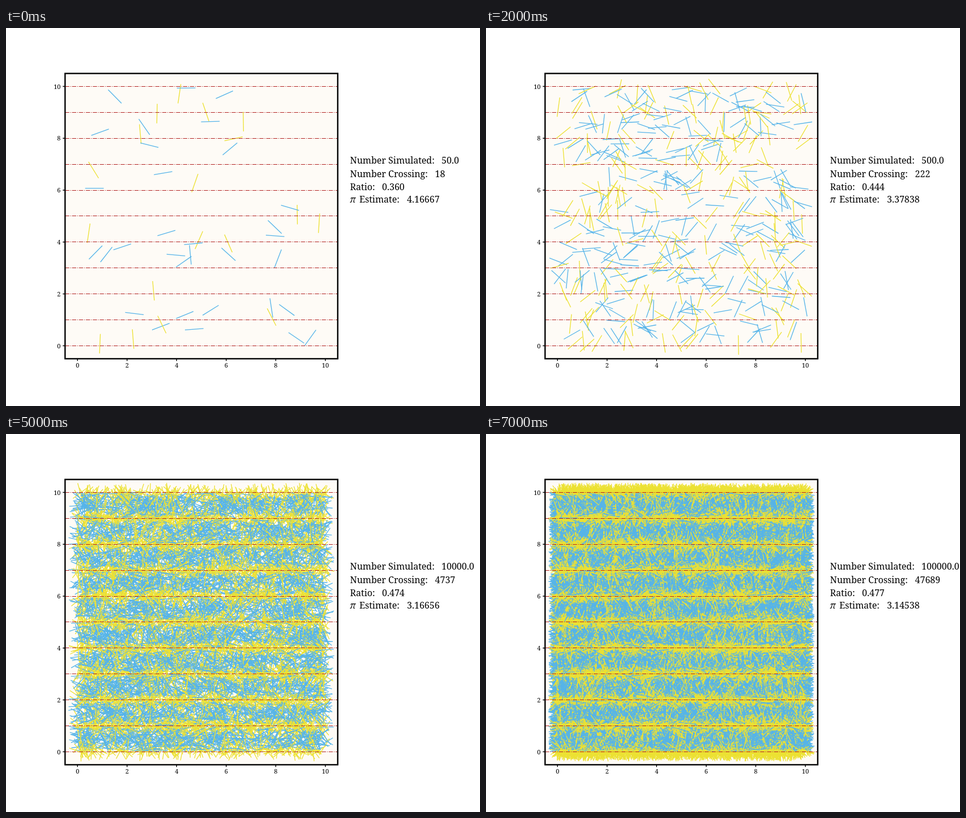
An HTML page with a canvas for the animation above (8000 ms loop, 837 by 669 pixels).

```html
<!DOCTYPE html>
<html lang="en">
<head>
<meta charset="utf-8">
<title>Needle drop estimate of pi</title>
<style>
html, body { margin: 0; width: 100%; height: 100%; overflow: hidden; background: #fff; }
canvas { display: block; }
</style>
</head>
<body>
<canvas id="stage" width="837" height="669"></canvas>
<script>
const ctx = document.getElementById("stage").getContext("2d");
const STEP = 1000;
const LENGTH = 0.75;
const UNIT_X = 43.77, UNIT_Y = 45.9;
const BLUE = "#56b4e9", YELLOW = "#ece133", RED = "#b22222";
const SERIF = "'Noto Serif', serif";

// [needles dropped, needles crossing a line]
const RUNS = [
  [50, 18], [100, 46], [500, 222], [1000, 471],
  [5000, 2338], [10000, 4737], [50000, 23980], [100000, 47689]
];

const toX = v => 126.2 + UNIT_X * v;
const toY = v => 562.4 - UNIT_Y * v;
const LEFT = toX(-0.5), TOP = toY(10.5);
const RIGHT = toX(10.5), BOTTOM = toY(-0.5);

function seeded(seed) {
  return () => {
    seed = (seed + 0x6d2b79f5) | 0;
    let t = Math.imul(seed ^ (seed >>> 15), 1 | seed);
    t = (t + Math.imul(t ^ (t >>> 7), 61 | t)) ^ t;
    return ((t ^ (t >>> 14)) >>> 0) / 4294967296;
  };
}

function line(x1, y1, x2, y2) {
  ctx.beginPath();
  ctx.moveTo(x1, y1);
  ctx.lineTo(x2, y2);
  ctx.stroke();
}

// Redraws a needle until it crosses a line, or misses them all, as asked
function toss(random, wanted) {
  let x, y, dx, dy, crosses;
  do {
    const angle = random() * Math.PI;
    x = random() * 10;
    y = random() * 10;
    dx = LENGTH / 2 * Math.cos(angle);
    dy = LENGTH / 2 * Math.sin(angle);
    crosses = Math.floor(y - dy) !== Math.floor(y + dy);
  } while (crosses !== wanted);
  line(toX(x - dx), toY(y - dy), toX(x + dx), toY(y + dy));
}

function dropNeedles(count, crossing) {
  const random = seeded(count);
  ctx.lineWidth = 1.3;
  let yellowLeft = crossing;
  for (let left = count; left > 0; left--) {
    const crosses = random() * left < yellowLeft;
    if (crosses) yellowLeft--;
    ctx.strokeStyle = crosses ? YELLOW : BLUE;
    toss(random, crosses);
  }
}

function drawRules() {
  ctx.strokeStyle = RED;
  ctx.lineWidth = 1.15;
  ctx.setLineDash([7.4, 1.85, 1.15, 1.85]);
  for (let v = 0; v <= 10; v++) {
    const y = Math.floor(toY(v)) + 0.5;
    line(LEFT, y, RIGHT, y);
  }
  ctx.setLineDash([]);
}

function drawAxes() {
  ctx.strokeStyle = ctx.fillStyle = "#000";
  ctx.lineWidth = 2.4;
  ctx.strokeRect(LEFT, TOP, RIGHT - LEFT, BOTTOM - TOP);
  ctx.lineWidth = 1.5;
  ctx.font = "11px " + SERIF;
  for (let v = 0; v <= 10; v += 2) {
    line(toX(v), BOTTOM, toX(v), BOTTOM + 4);
    line(LEFT - 4, toY(v), LEFT, toY(v));
    ctx.textAlign = "center";
    ctx.fillText(v, toX(v), 601);
    ctx.textAlign = "right";
    ctx.fillText(v, 96.5, toY(v) + 4.2);
  }
}

function drawStats(count, crossing) {
  const x = 607.5;
  const row = (label, labelX, value, valueX, y) => {
    ctx.fillText(label, labelX, y);
    ctx.fillText(value, valueX, y);
  };
  ctx.textAlign = "left";
  ctx.font = "16px " + SERIF;
  row("Number Simulated:", x, count.toFixed(1), 769, 240.3);
  row("Number Crossing:", x, crossing, 757.5, 264);
  row("Ratio:", x, (crossing / count).toFixed(3), 664, 286.7);
  row("Estimate:", 624, (2 * LENGTH * count / crossing).toFixed(5), 708, 309.3);
  ctx.font = "italic 16px " + SERIF;
  ctx.fillText("π", x, 309.3);
}

function draw([count, crossing]) {
  ctx.fillStyle = "#fff";
  ctx.fillRect(0, 0, 837, 669);
  ctx.fillStyle = "#fefbf6";
  ctx.fillRect(LEFT, TOP, RIGHT - LEFT, BOTTOM - TOP);
  dropNeedles(count, crossing);
  drawRules();
  drawAxes();
  drawStats(count, crossing);
}

let shown = -1;
const start = performance.now();

function tick() {
  const run = Math.floor((performance.now() - start) / STEP) % RUNS.length;
  if (run !== shown) draw(RUNS[shown = run]);
  requestAnimationFrame(tick);
}
tick();
</script>
</body>
</html>
```
